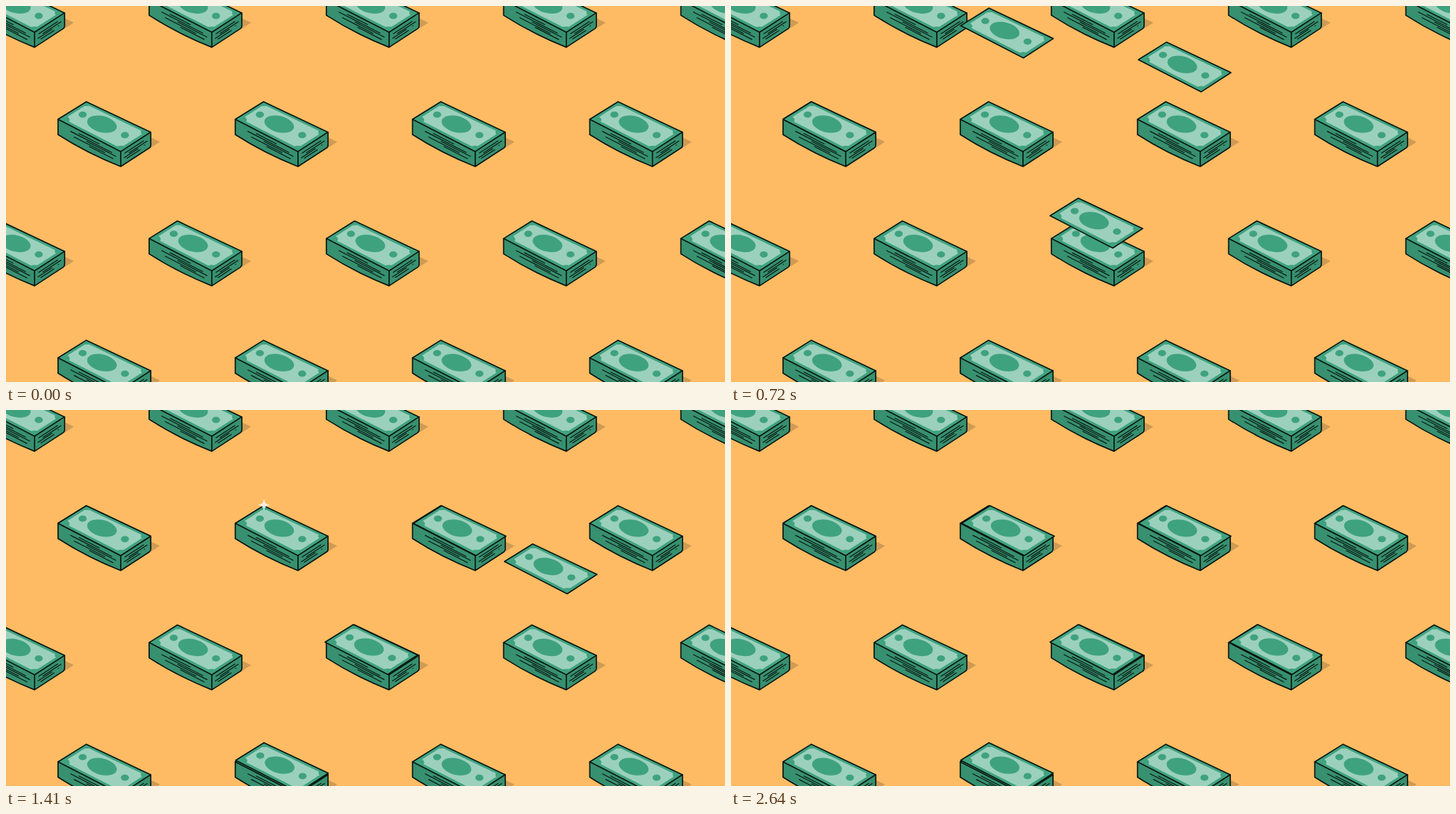
Recreate the animation shown at these times as an HTML page. Size 1034x541 px, loop 2.74 s.

```html
<!DOCTYPE html>
<html lang="en">
<head>
<meta charset="utf-8">
<title>Falling banknotes</title>
<style>
  html, body { margin: 0; width: 100%; height: 100%; overflow: hidden; background: #ffbb63; }
  svg { display: block; width: 100vw; height: 100vh; }
</style>
</head>
<body>
<svg viewBox="0 0 1034 541" preserveAspectRatio="none">
  <defs>
    <path id="face" d="M41.5 .7L134 44.5L91 72.4L.8 26Z"/>
    <clipPath id="faceClip"><use href="#face"/></clipPath>
    <g id="note">
      <use href="#face" fill="#3fa27f"/>
      <path d="M42 5L125.5 44.8L90.5 67.2L9.5 25.8Z" fill="#9bd0bd"/>
      <g fill="#3fa27f" clip-path="url(#faceClip)">
        <ellipse cx="41.5" cy="1.5" rx="9" ry="5.5"/>
        <ellipse cx="7" cy="27" rx="10.5" ry="6.5"/>
        <ellipse cx="129" cy="44.5" rx="9" ry="5.5"/>
        <ellipse cx="91" cy="70" rx="10.5" ry="6"/>
        <ellipse cx="64" cy="33" rx="21.8" ry="11.8" transform="rotate(14 64 33)"/>
        <ellipse cx="36.2" cy="19.2" rx="5.8" ry="4.5"/>
        <ellipse cx="97" cy="48.8" rx="5.8" ry="4.5"/>
      </g>
      <use href="#face" fill="none" stroke="#07130f" stroke-width="1.7" stroke-linejoin="round"/>
    </g>
    <g id="stack" stroke-linejoin="round" stroke-linecap="round">
      <path d="M134 52L147.5 58.5L134 67Z" fill="#cf9b55"/>
      <path d="M.8 26V48Q42 74.5 91 94L132.5 67Q134.6 65.5 134.2 61V44.5L91 72.4Z" fill="#37906f"/>
      <g id="hatch" fill="none" stroke="#07130f" stroke-width="1.15"></g>
      <path d="M.8 26V48Q42 74.5 91 94L132.5 67Q134.6 65.5 134.2 61V44.5M91 72.4V94" fill="none" stroke="#07130f" stroke-width="1.7"/>
      <use href="#note"/>
    </g>
    <path id="star" d="M0 -9Q.8 -.8 9 0Q.8 .8 0 9Q-.8 .8 -9 0Q-.8 -.8 0 -9Z" fill="#fff" stroke="#fff" stroke-width=".8"/>
  </defs>
  <rect width="1034" height="541" fill="#ffbb63"/>
  <g id="stacks"></g>
  <g id="notes"></g>
  <g id="stars"></g>
</svg>
<script>
const LOOP = 2740, STEP = 30, ANCHORS = [2100, 1760, 90, 0];
const $ = id => document.getElementById(id);

function add(parent, tag, attrs) {
  const el = document.createElementNS('http://www.w3.org/2000/svg', tag);
  for (const key in attrs) el.setAttribute(key, attrs[key]);
  return $(parent).appendChild(el);
}
const place = (el, x, y, scale = 1) =>
  el.setAttribute('transform', `translate(${x} ${y}) scale(${scale})`);

// Paper edges: start x, end x, depth below the top edge
const leftLines = [[31, 60, 5], [19, 78, 8], [42, 84, 10.5], [24, 68, 13.5], [46, 80, 16]];
const rightLines = [[97, 124, 6], [103, 129, 9.5], [96, 116, 12], [100, 119, 15.5], [125, 125.5, 13]];
const hatch = (lines, y0, slope) => lines.map(([a, b, d]) =>
  `M${a} ${y0 + slope * a + d}L${b} ${y0 + slope * b + d}`).join('');
add('hatch', 'path', { d: hatch(leftLines, 25.6, .514) + hatch(rightLines, 131.6, -.65) });

for (let row = -1; row < 3; row++)
  for (let col = -1; col < 4; col++) {
    const x = 74 + 254.9 * col + (row % 2 ? 131 : 0);
    place(add('stacks', 'use', { href: '#stack' }), x, 137 + 171.6 * row);
  }

// Landing x, landing y, landing time, speed in px per ms
const notes = [
  [74, 137, 631, .55],
  [458, 308, 770, .644],
  [585, 137, 876, .55],
  [329.5, 478, 1291, .833],
  [716, 308, 1590, .644],
  [331, 137, 2547, .55],
  [839, 137, 2640, .55]
].map(([x, y, land, speed]) => ({ x, y, land, speed, el: add('notes', 'use', { href: '#note' }) }));

// Centre x, centre y, times of the two flashes
const stars = [
  [340, 352, 85, 475],
  [717.5, 181, 533, 875],
  [371, 136.7, 1375, 1750],
  [879, 136.5, 2090, 2405]
].map(([x, y, ...starts]) => ({ x, y, starts, el: add('stars', 'use', { href: '#star' }) }));

const FLASH = 130;
function glow(age) {
  return age > 0 && age < FLASH ? Math.sin(Math.PI * age / FLASH) ** .6 : 0;
}

function draw(time) {
  const t = time % LOOP;
  const base = ANCHORS.find(a => a <= t);
  const now = base + Math.floor((t - base) / STEP) * STEP;
  for (const n of notes) {
    const y = n.y - Math.max(0, n.land - now) * n.speed;
    n.el.style.display = y < -76 ? 'none' : '';
    place(n.el, n.x, y);
  }
  for (const s of stars) {
    const size = Math.max(...s.starts.map(start => glow(now - start)));
    s.el.style.display = size ? '' : 'none';
    s.el.setAttribute('opacity', size);
    place(s.el, s.x, s.y, size);
  }
}

const began = performance.now();
function tick() {
  draw(performance.now() - began);
  requestAnimationFrame(tick);
}
tick();
</script>
</body>
</html>
```
